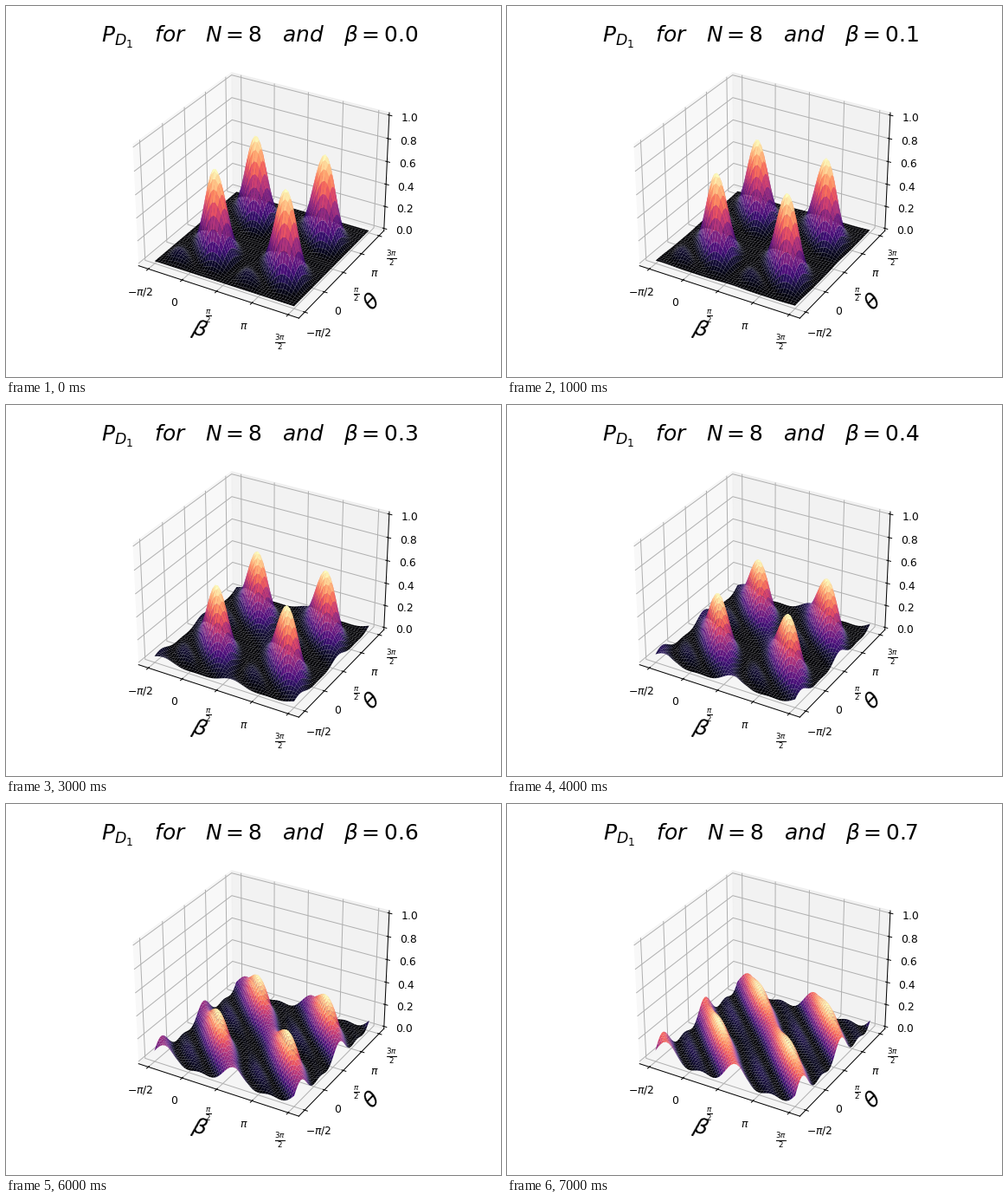
A matplotlib script that plays this animation: 572x428 px, repeating every 8 s.

```python
import numpy as np
import matplotlib.pyplot as plt
from matplotlib.animation import FuncAnimation

WIDTH, HEIGHT, DPI = 572, 428, 89.375
FRAMES, INTERVAL = 8, 1000
PI = np.pi

TICKS = [-PI / 2, 0, PI / 2, PI, 3 * PI / 2]
TICK_LABELS = [r"$-\pi/2$", "$0$", r"$\frac{\pi}{2}$", r"$\pi$",
               r"$\frac{3\pi}{2}$"]
HALF_SPAN = PI * 1.1 * 25 / 24
SIDE = (PI / 2 - HALF_SPAN, PI / 2 + HALF_SPAN)

axis = np.linspace(-PI / 2, 3 * PI / 2, 50)
X, Y = np.meshgrid(axis, axis)


def probability(beta):
    """Joint probability of an entangled pair times an interference term."""
    pair = (np.cos(beta) * np.cos(X) * np.cos(Y)
            - np.sin(beta) * np.sin(X) * np.sin(Y))
    phase = 3 * PI / 16 + 0.7 * beta
    return 0.823 * (pair * np.cos(X + Y - phase))**2


fig = plt.figure(figsize=(WIDTH / DPI, HEIGHT / DPI), dpi=DPI)
ax = fig.add_subplot(projection="3d")
ax.set_xlim(*SIDE)
ax.set_ylim(*SIDE)
ax.set_zlim(-1 / 48, 49 / 48)
ax.set_xticks(TICKS, TICK_LABELS)
ax.set_yticks(TICKS, TICK_LABELS)
ax.set_zticks(np.linspace(0, 1, 6))
ax.set_xlabel(r"$\beta$", fontsize=20)
ax.set_ylabel(r"$\theta$", fontsize=20)


def update(frame):
    beta = frame / 10
    for surface in list(ax.collections):
        surface.remove()
    ax.plot_surface(X, Y, probability(beta), cmap="magma", linewidth=0)
    ax.set_title(r"$P_{D_1} \quad for \quad N=8 \quad and \quad \beta=%.1f$"
                 % beta, fontsize=20)
    return ax.collections


anim = FuncAnimation(fig, update, frames=FRAMES, interval=INTERVAL,
                     init_func=lambda: [], repeat=True, repeat_delay=0)
plt.show()
```
